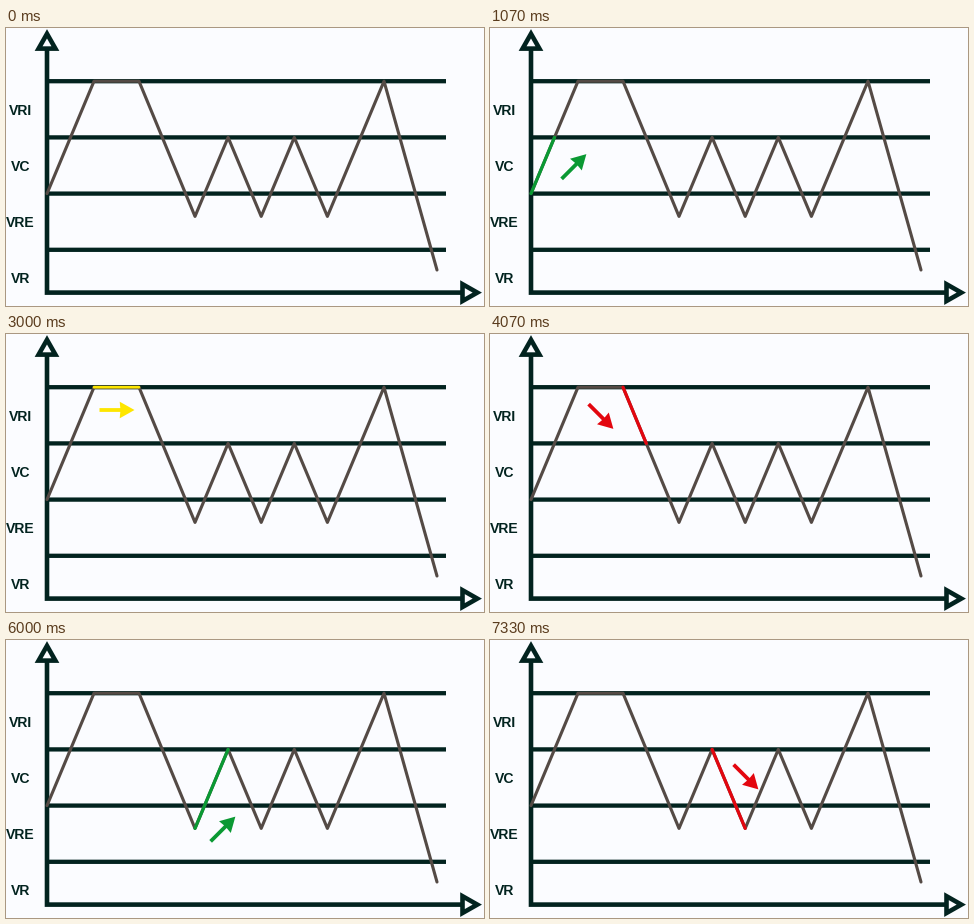
Animation of 478 by 278 pixels, one loop 8000 ms. Source, as a matplotlib script:

```python
import matplotlib.pyplot as plt
import numpy as np
from matplotlib.animation import FuncAnimation

W, H, DPI = 478, 278, 64
PX = 72 / DPI  # points per pixel

BG, INK, TRACE = "#fbfcff", "#02231f", "#544a45"
RISE, HOLD, FALL = "#0a9933", "#fee600", "#e3060f"

STEP = 56.2  # height of one speed band
TOP, MID, BASE, LAST = 53.2 + STEP * np.arange(4)
LOW, END = 188.4, 242
X0, Y0 = 41, 264.6  # origin of the axes

fig = plt.figure(figsize=(W / DPI, H / DPI), dpi=DPI, facecolor=BG)
ax = fig.add_axes([0, 0, 1, 1])
ax.set(xlim=(0, W), ylim=(H, 0))
ax.axis("off")


def line(points, color, width, z=1, cap="butt", join="round", **kw):
    return ax.plot(*zip(*points), color=color, lw=width * PX, zorder=z,
                   solid_capstyle=cap, solid_joinstyle=join, snap=False, **kw)[0]


def place(points, x, y, angle):
    """Turn points by angle in degrees and move them to (x, y)."""
    c, s = np.cos(np.radians(angle)), np.sin(np.radians(angle))
    return np.array(points) @ np.array([[c, s], [-s, c]]) + (x, y)


def axis_head(x, y, angle):
    corners = place([(0, -8.4), (14.8, 0), (0, 8.4)], x, y, angle)
    ax.fill(*corners.T, fc=BG, ec=INK, lw=4.6 * PX, joinstyle="miter",
            zorder=3, snap=False)


def arrow(x, y, angle, color):
    """Arrow of 35 px centred on (x, y)."""
    half = [(-17.5, 1.9), (3.3, 1.9), (2.7, 8.3), (17.5, 0)]
    outline = half + [(u, -v) for u, v in half[-2::-1]]
    return ax.fill(*place(outline, x, y, angle).T, fc=color, ec="none",
                   zorder=5)[0]


# Levels, axes and band names
for y in (TOP, MID, BASE, LAST):
    line([(X0, y), (440, y)], INK, 4.3)
line([(X0, 20), (X0, Y0), (457, Y0)], INK, 4.6, join="miter")
axis_head(X0, 20.6, -90)
axis_head(456.5, Y0, 0)
for i, name in enumerate(["VRI", "VC", "VRE", "VR"]):
    ax.text(14.6, 86.6 + STEP * i, name, color=INK, ha="center", va="baseline",
            family="Liberation Sans", weight="bold", size=14 * PX)

# Speed curve: climb, hold, drop, zigzag, climb, drop
zigzag = [(189 + 33.1 * i, (LOW, MID)[i % 2]) for i in range(5)]
curve = [(X0, BASE), (88, TOP), (133, TOP), *zigzag, (378, TOP), (431, END)]
line(curve, TRACE, 3.1, 4, "round")

# The first climb and the first drop are split where they cross MID
stops = curve[:6]
for i in (3, 1):
    (xa, ya), (xb, yb) = stops[i - 1], stops[i]
    stops.insert(i, (xa + (xb - xa) * (MID - ya) / (yb - ya), MID))

centres = [(84, 138.5), (95.5, 82.5), (111, 76), (111, 82.5),
           (113.5, 138.5), (217, 189), (256, 137)]


def highlight(a, b, centre):
    trend = int(np.sign(b[1] - a[1]))  # y grows downwards
    color = {-1: RISE, 0: HOLD, 1: FALL}[trend]
    width = 3.2 if trend else 2.7
    return line([a, b], color, width, 5, "round"), arrow(*centre, 45 * trend, color)


marks = [highlight(*args) for args in zip(stops, stops[1:], centres)]


def update(second):
    for i, pair in enumerate(marks, start=1):
        for artist in pair:
            artist.set_visible(i == second)
    return [artist for pair in marks for artist in pair]


anim = FuncAnimation(fig, update, frames=len(marks) + 1, interval=1000,
                     repeat=True, repeat_delay=0)
plt.show()
```
